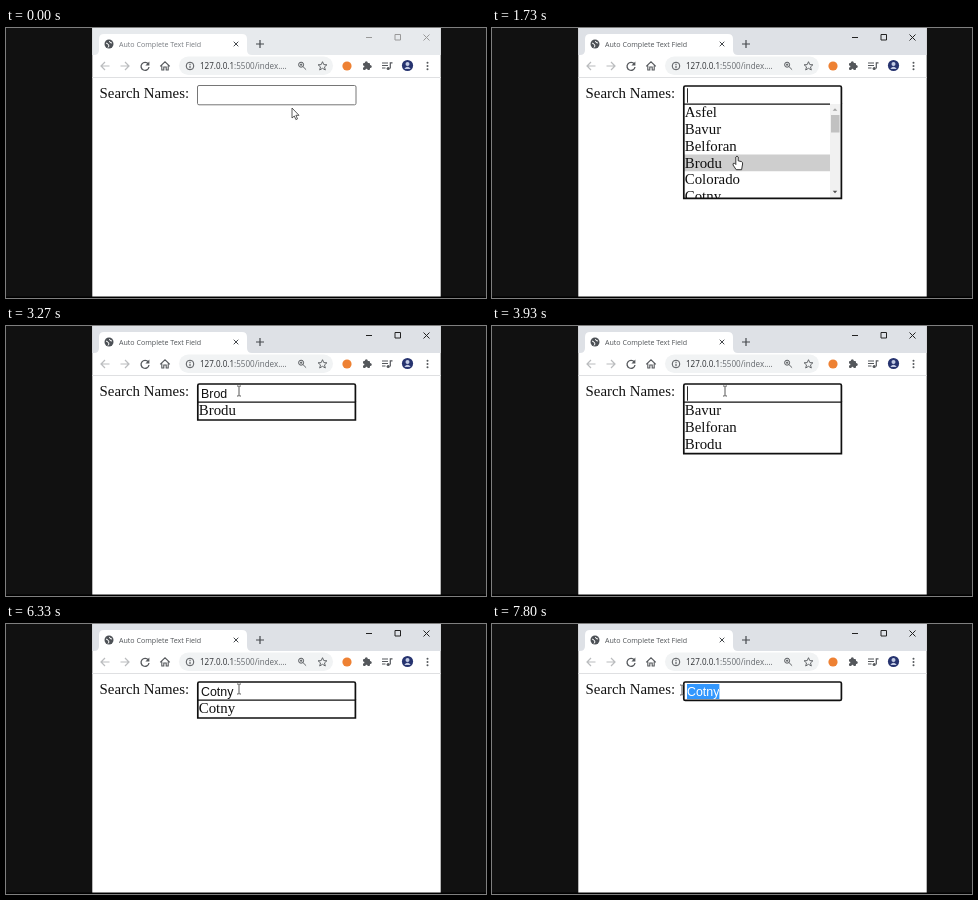
Animation of 480x270 px, one loop 8000 ms. Source, as an HTML page with a canvas:

```html
<!DOCTYPE html>
<html lang="en">
<head>
<meta charset="utf-8">
<title>Auto Complete Text Field</title>
<style>
  html, body { margin: 0; width: 100%; height: 100%; overflow: hidden; background: #111; }
  canvas { display: block; }
</style>
</head>
<body>
<canvas width="480" height="270"></canvas>
<script>
const ctx = document.querySelector('canvas').getContext('2d');
const LOOP = 8000, STEP = 200 / 3;
const UI = '"Open Sans", "Noto Sans", sans-serif';
const SERIF = '14.85px "Liberation Serif", serif';
const SANS = '12.4px "Liberation Sans", sans-serif';
const NAMES = ['Asfel', 'Bavur', 'Belforan', 'Brodu', 'Colorado', 'Cotny'];
const ROW = 16.8, LIST_TOP = 76, TEXT_X = 195;
const BLACK = '#101010';

// Pointer hot spot: time, x, y
const POINTER = [
  [0, 286, 80], [60, 286, 80], [133, 288, 67], [800, 288, 67], [1066, 293, 85],
  [1670, 245, 128], [1800, 245, 128], [2400, 236, 64], [2533, 236, 64], [2600, 233, 65],
  [6400, 233, 65], [6733, 240, 80], [7133, 240, 80], [7333, 235, 66], [7400, 235, 66],
  [7800, 190, 66], [8001, 190, 66]
];

// Field state: time, typed text, list prefix (null = closed), caret blink start (none = blurred)
const STATES = [
  [0, '', null], [330, '', null, 330], [395, '', '', 330],
  [1860, 'Brodu', null], [2530, 'Brodu', 'Brodu', 2530],
  [3260, 'Brod', 'Brodu', 2530], [3460, 'Br', 'Brodu', 3460], [3530, 'B', 'Brodu', 3530],
  [3595, '', 'Brodu', 3595], [3795, '', 'B', 3595], [4130, '', '', 3595],
  [4395, 'C', '', 4395], [4460, 'C', 'C', 4395],
  [5195, 'Co', 'C', 5195], [5530, 'Cot', 'C', 5530], [5660, 'Cotn', 'Cot', 5660],
  [5795, 'Cotny', 'Cotny', 5795], [6860, 'Cotny', null], [7460, 'Cotny', null, 7460]
];

function rect(x, y, w, h, color, radius = 0) {
  ctx.fillStyle = color;
  ctx.beginPath();
  ctx.roundRect(x, y, w, h, radius);
  ctx.fill();
}
function frame(x, y, w, h, color, width, radius = 0) {
  ctx.strokeStyle = color;
  ctx.lineWidth = width;
  ctx.beginPath();
  ctx.roundRect(x, y, w, h, radius);
  ctx.stroke();
}
function circle(x, y, r, color) { rect(x - r, y - r, 2 * r, 2 * r, color, r); }
function text(str, x, y, font, color = '#111') {
  ctx.font = font;
  ctx.fillStyle = color;
  ctx.fillText(str, x, y);
}
function shape(x, y, path, stroke, width = 1, fill) {
  const p = new Path2D(path);
  ctx.save();
  ctx.translate(x, y);
  if (fill) { ctx.fillStyle = fill; ctx.fill(p); }
  if (stroke) { ctx.strokeStyle = stroke; ctx.lineWidth = width; ctx.stroke(p); }
  ctx.restore();
}
function textWidth(str) {
  ctx.font = SANS;
  return ctx.measureText(str).width;
}

function pointerAt(t) {
  const i = POINTER.findIndex(k => k[0] > t);
  const [t0, x0, y0] = POINTER[i - 1], [t1, x1, y1] = POINTER[i];
  const u = (t - t0) / (t1 - t0), e = u * u * (3 - 2 * u);
  return { x: x0 + (x1 - x0) * e, y: y0 + (y1 - y0) * e };
}

function drawBrowser(active) {
  const control = active ? '#222' : '#999';
  const icon = '#55585c';
  rect(0, 0, 480, 270, '#111');
  rect(0, 268.5, 480, 1.5, '#000');
  rect(86.3, 0, 348.4, 268.5, '#fff');
  rect(86.3, 0, 348.4, 27, active ? '#dee1e6' : '#e7eaed');
  shape(0, 0, 'M88 27Q93 27 93 22V11Q93 6 98 6H236Q241 6 241 11V22Q241 27 246 27Z', null, 0, '#fff');
  rect(86.3, 49, 348.4, 1, '#dfe0e2');

  circle(103, 16, 4.5, '#4d5156');
  shape(103, 16, 'M-3-1L-1 0 0 2-1 3.5M.5-3L1-1.5 3-1', '#fff', 1);
  text('Auto Complete Text Field', 113, 18.8, '7.1px ' + UI, active ? '#505458' : '#777b80');
  shape(230, 16, 'M-2.3-2.3L2.3 2.3M2.3-2.3L-2.3 2.3', '#45494d', 1);
  shape(254, 16, 'M-4 0H4M0-4V4', '#45494d', 1.2);
  shape(363, 9.5, 'M-3 0H3', control);
  frame(389, 6.5, 5.5, 5.5, control, 1);
  shape(420.5, 9.5, 'M-3-3L3 3M3-3L-3 3', control);

  shape(99, 38, 'M4.5 0H-4M0-4L-4 0 0 4', '#babcbe', 1.2);
  shape(119, 38, 'M-4.5 0H4M0-4L4 0 0 4', '#babcbe', 1.2);
  shape(139, 38, 'M3.3-2A4 4 0 1 0 4 1', icon, 1.3);
  shape(139, 38, 'M4.4-4.6V-.5H.4Z', null, 0, icon);
  shape(159, 38, 'M-4.8 .3L0-4.2 4.8 .3M-3.2-.6V4H-1.2V1H1.2V4H3.2V-.6', icon, 1.1);

  rect(173, 28.5, 154, 18.5, '#f1f3f4', 9.25);
  frame(180.2, 34.2, 7.6, 7.6, icon, 1, 3.8);
  shape(184, 38, 'M0-2.2V-1M0-.3V2.3', icon, 1.1);
  text('127.0.0.1', 194, 41, '8.07px ' + UI, '#2a2c30');
  const hostEnd = 194 + ctx.measureText('127.0.0.1').width;
  text(':5500/index....', hostEnd, 41, '8.07px ' + UI, '#65696e');
  frame(292.6, 34.2, 5, 5, icon, 1, 2.5);
  shape(295.1, 36.7, 'M-1.2 0H1.2M0-1.2V1.2M1.8 1.8L5 5', icon, .9);
  shape(316.5, 38, 'M0-4.3L1.3-1.4 4.4-1.2 2 .9 2.8 4 0 2.3-2.8 4-2 .9-4.4-1.2-1.3-1.4Z', icon, .9);

  circle(341, 38, 4.6, '#ee8133');
  rect(357, 35, 7, 7, icon, 1);
  circle(360.3, 34.8, 1.5, icon);
  circle(364.2, 38.4, 1.5, icon);
  circle(357.3, 38.5, 1.1, '#fff');
  circle(360.5, 41.8, 1.1, '#fff');
  shape(381, 38, 'M-5-3H1M-5-.5H1M-5 2H-1.5M3.3 2.5V-3.2H5.5', icon, 1.2);
  circle(382.2, 40.5, 1.6, icon);
  circle(401.5, 37.5, 5.6, '#26336f');
  circle(401.5, 36, 2, '#c3cbe4');
  shape(401.5, 37.5, 'M-3.2 3.4Q0-1 3.2 3.4Z', null, 0, '#c3cbe4');
  for (const dy of [-3.3, 0, 3.3]) circle(421.5, 38 + dy, 1, icon);

  text('Search Names:', 93.6, 70.4, SERIF);
}

function drawField(t, value, blinkStart, pointer, inField) {
  const focused = blinkStart !== undefined;
  rect(191, 57, 159, 20, '#fff', 1.5);
  if (focused) frame(191.8, 58, 157.6, 18.4, BLACK, 1.7, 1.5);
  else frame(191.5, 57.5, 158.5, 19.3, inField ? '#4f4f4f' : '#767676', 1, 1.5);
  text(value, TEXT_X, 71.8, SANS);

  let from = value.length;
  if (t > 7400) {
    while (from > 0 && pointer.x < TEXT_X + textWidth(value.slice(0, from - 1)) + 3) from--;
  }
  const x = TEXT_X + textWidth(value.slice(0, from));
  if (from < value.length) {
    rect(x, 60, TEXT_X + textWidth(value) - x, 15, '#3297fd');
    text(value.slice(from), x, 71.8, SANS, '#fff');
  } else if (focused && (t - blinkStart) % 1000 < 500) {
    rect(x, 60.3, .9, 14.4, '#111');
  }
}

function drawList(prefix, pointer, hovering) {
  const rows = NAMES.filter(name => name.startsWith(prefix));
  const scrolls = rows.length > 5;
  const height = scrolls ? 94.3 : rows.length * ROW + 1.2;
  const right = scrolls ? 338 : 349;
  const hovered = hovering ? Math.floor((pointer.y - LIST_TOP) / ROW) : -1;
  ctx.save();
  ctx.beginPath();
  ctx.rect(192, 75, 157.5, LIST_TOP + height - 75);
  ctx.clip();
  rect(192, 75, 158, height + 1, '#fff');
  rows.forEach((name, i) => {
    if (i === hovered) rect(192, LIST_TOP + i * ROW, right - 192, ROW, '#cecece');
    text(name, 192.8, 89.1 + i * ROW, SERIF);
  });
  if (hovered !== 0) rect(192, 75.6, right - 192, 1.2, BLACK);
  if (scrolls) {
    rect(338, LIST_TOP, 11, height, '#f1f1f1');
    rect(339, 87, 8.5, 17.5, '#c1c1c1');
    shape(343, 81.5, 'M-2.3 1.2L0-1.2 2.3 1.2Z', null, 0, '#a3a3a3');
    shape(343, 164, 'M-2.3-1.2L0 1.2 2.3-1.2Z', null, 0, '#505050');
  }
  ctx.restore();
  shape(191.8, 75, `M0 0V${height + 1}H157.6V0`, BLACK, 1.7);
}

function drawPointer({ x, y }, inField, onList) {
  if (inField) shape(x, y, 'M-2-5H-.5L0-4.5 .5-5H2M0-4.5V4.5M-2 5H-.5L0 4.5 .5 5H2', '#444', .9);
  else if (onList) {
    shape(x, y, 'M-1.2 1Q0-1 1.2 1V4.8L4.5 5.6Q5.8 6 5.6 8L4.6 13.7H-.8L-4 9Q-4.2 6.6-2.4 7.3L-1.2 8.5Z', '#222', .9, '#fff');
  } else shape(x, y, 'M0 0V10L2.3 8 3.9 11.6 5.5 10.9 3.9 7.3H7Z', '#333', .8, '#fff');
}

function draw(now) {
  const t = Math.floor(((now + 5) % LOOP) / STEP) * STEP;
  const [, value, prefix, blinkStart] = STATES.findLast(s => s[0] <= t + 1);
  const pointer = pointerAt(t);
  const inField = pointer.y > 57 && pointer.y < 77;
  const onList = prefix !== null && !inField;
  drawBrowser(t > 325);
  drawField(t, value, blinkStart, pointer, inField);
  if (prefix !== null) drawList(prefix, pointer, onList);
  drawPointer(pointer, inField, onList);
  requestAnimationFrame(draw);
}
requestAnimationFrame(draw);
</script>
</body>
</html>
```
